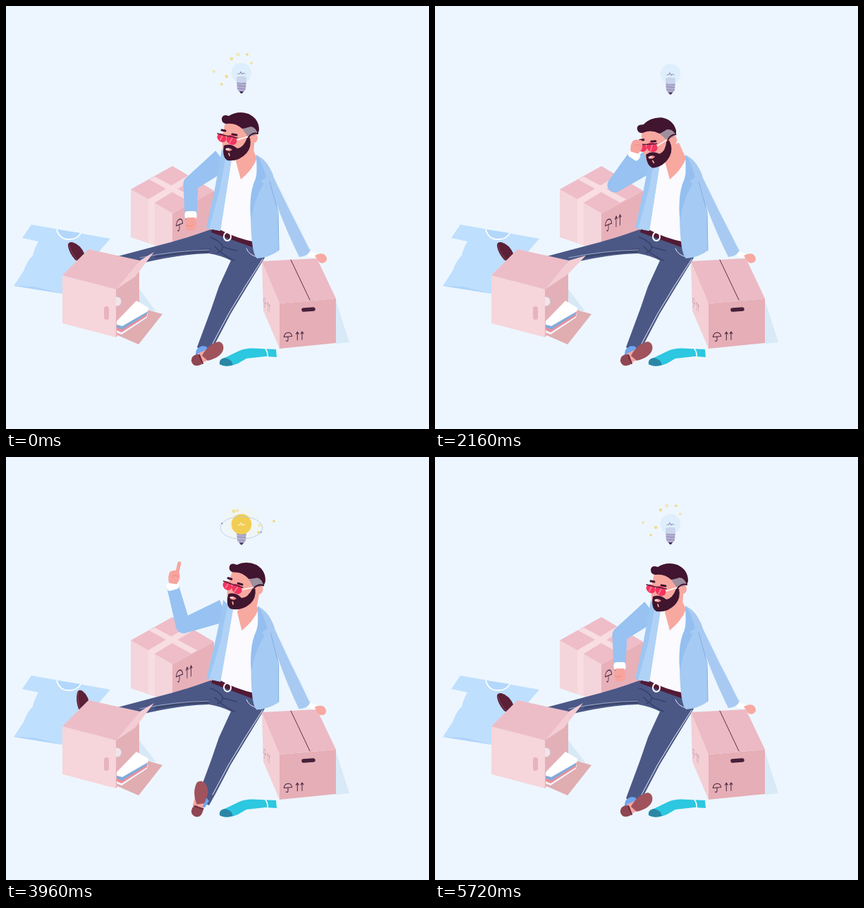
An HTML page that plays this animation: 600 by 600 pixels, repeating every 5.76 s.

```html
<!DOCTYPE html>
<html lang="en">
<head>
<meta charset="utf-8">
<title>Idea</title>
<style>
html, body { margin: 0; width: 100%; height: 100%; overflow: hidden; background: #edf6fe }
svg { display: block; width: 100vw; height: 100vh }
.line { fill: none; stroke-linecap: round; stroke-linejoin: round }
</style>
</head>
<body>
<svg viewBox="0 0 600 600">
<defs>
  <radialGradient id="halo">
    <stop offset=".3" stop-color="#fcf3c9"/>
    <stop offset="1" stop-color="#fcf3c9" stop-opacity="0"/>
  </radialGradient>
  <g id="marks" class="line" stroke="#4a2942" stroke-width="1.1">
    <path d="M-6 0Q-5 -6 0 -6Q5 -6 6 0ZM0 0V5Q-1 8 -3 6M14 6V-6M12 -3L14 -6L16 -3M21 6V-6M19 -3L21 -6L23 -3"/>
  </g>
</defs>

<!-- shirt on the floor -->
<path fill="#bfdffe" d="M36 310L148 330L134 346L100 408H80L11 397L25 376Q30 361 38 354Q40 344 46 334L23 329Z"/>
<path fill="#aed3fa" d="M11 397L40 398L80 408Z"/>
<path fill="#b3d7fb" stroke="#fff" stroke-width="1.8" d="M72 317Q76 331 89 331Q102 331 106 322"/>

<!-- taped box -->
<path fill="#f4d5db" d="M177 260L236 294V348L177 328Z"/>
<path fill="#e8b1ba" d="M236 294L295 262V330L236 348Z"/>
<path fill="#eebdc8" d="M236 227L295 262L236 294L177 260Z"/>
<path fill="#f8dde2" d="M203 246L211 242L271 274L263 279ZM259 240L267 245L211 279V340L202 336V274Z"/>
<use href="#marks" transform="translate(246 310) skewY(-22) scale(.78 1.25)"/>

<!-- far foot and legs -->
<g id="farFoot">
  <path fill="#5b2038" d="M88 341Q87 334 94 335Q106 338 112 353L110 366L98 360Q90 351 88 341Z"/>
  <path class="line" stroke="#8a4055" d="M89 339Q93 352 102 361"/>
</g>
<path fill="#4b5886" d="M290 317Q252 331 215 340L151 357L188 366Q245 352 288 351Q306 354 319 361L302 398L291 430L271 484Q278 490 288 494L297 478L319 436L342 398L367 357L352 335Z"/>
<path fill="#3c476f" d="M210 358Q250 350 287 350L290 344Q250 347 213 354Z"/>
<path class="line" stroke="#e9eefb" stroke-width="1" d="M364 359L339 398L316 436L293 479M341 344Q345 354 357 356"/>
<path class="line" stroke="#c6cfe8" stroke-width=".7" d="M190 357Q240 347 288 346"/>
<path class="line" stroke="#37406a" stroke-width="1.6" d="M290 328Q304 333 308 342L327 347M300 350Q311 345 305 337M296 341Q308 354 324 361"/>

<!-- open box -->
<path fill="#d7e9f7" d="M187 399L213 433L190 430Z"/>
<path fill="#e0adb1" d="M156 466L190 428L222 437L188 480Z"/>
<path fill="#e4b0b7" d="M155 402L189 362V428L156 470Z"/>
<circle cx="157" cy="419" r="7" fill="#f2e4e9" stroke="#c9bcc8"/>
<path fill="#f4f5fb" d="M157 456L190 432L201 437L200 442L164 466L157 463Z"/>
<path fill="#ec8f9b" d="M157 455L200 436V440L164 463L157 460Z"/>
<path fill="#82abd9" d="M157 449L200 432V437L165 459L157 456Z"/>
<path fill="#fff" d="M157 447L185 418L202 428Q203 433 198 435L165 454L157 452Z"/>
<path fill="#f6d5db" d="M80 382L156 402V470L80 450Z"/>
<path fill="#edbdc7" d="M117 345L190 361L156 402L80 382Z"/>
<rect x="139" y="426" width="7" height="19" rx="3.5" fill="#e7b3be"/>
<path id="flap" fill="#f4cdd4"/>

<!-- sock -->
<path fill="#2cc7e0" d="M304 502L331 489Q341 484 360 486L383 487L384 498L368 497L341 500L329 507Q313 514 303 508Z"/>
<path fill="#2b86a5" d="M303 508Q302 500 311 499Q320 501 322 509Q311 513 303 508Z"/>
<path class="line" stroke="#fff" stroke-width="1.5" d="M368 486Q372 492 371 498"/>

<!-- near foot -->
<path fill="#6ea5ee" d="M270 488Q276 480 284 483L288 488L282 497L268 499Z"/>
<g id="nearFoot">
  <path fill="#f4a59f" d="M272 493L285 487L292 499L279 506Z"/>
  <path fill="#a0535c" d="M278 496Q287 479 302 476Q310 478 308 488Q304 499 286 503Z"/>
  <path fill="#8f4652" d="M263 504Q262 496 271 494L276 496L278 508Q266 514 263 504Z"/>
  <path class="line" stroke="#6d2c40" stroke-width="2" d="M274 495L279 507"/>
</g>

<!-- closed box -->
<path fill="#d8e9f7" d="M468 418L487 477L468 479Z"/>
<path fill="#f4cfd5" d="M363 362L388 422V486L365 432Z"/>
<path fill="#e6aeb6" d="M388 422L468 415V478L388 486Z"/>
<path fill="#ecbac4" d="M363 362L441 358L468 415L388 422Z"/>
<path class="line" stroke="#5b3146" d="M404 360L431 417"/>
<path class="line" stroke="#46203a" stroke-width="5.5" d="M422 431L436 430"/>
<use href="#marks" transform="translate(400 469) skewY(-4) scale(.95)"/>
<use href="#marks" transform="translate(367 421) skewY(50) scale(.32 1)" opacity=".35"/>
<g id="restHand">
  <path fill="#fff" d="M429 347L441 352L438 358L428 355Z"/>
  <path fill="#f7a9a2" d="M438 354Q445 350 451 352Q457 357 454 362Q449 367 444 363Z"/>
</g>

<!-- upper body -->
<g id="body">
  <path fill="#521a35" d="M293 313L354 333L352 343L291 321Z"/>
  <ellipse class="line" stroke="#fff" stroke-width="2" cx="314" cy="327" rx="5" ry="6"/>
  <g id="sleeve" fill="#97c2f1"><path id="limbs"/><circle id="joint" r="10.5"/></g>
  <path fill="#fafaff" d="M318 214L303 317Q325 329 354 335L352 262L366 236L354 212Z"/>
  <path fill="#9dc6f2" d="M306 203Q301 235 296 260L284 315L304 319L320 216Z"/>
  <path fill="#b0d2f6" d="M312 212L320 217L304 319L288 316L303 262Z"/>
  <path fill="#f7a9a0" d="M326 220L334 198L346 194L356 216Q350 232 333 246Z"/>
  <path fill="#a5caf3" d="M355 211Q371 219 379 240L386 300L387 347Q373 357 356 358Q348 352 347 300Q344 272 356 246Z"/>
  <path fill="#94bff0" d="M355 211Q364 222 369 243L361 248L365 252Q350 280 348 303Q344 270 352 250Q358 238 355 211Z"/>
  <path fill="#a8caf2" d="M360 214Q371 221 376 235L384 252L403 291L432 346Q429 355 416 356Q403 330 391 300L374 256Z"/>
  <path class="line" stroke="#7faee6" d="M374 249L386 292L387 346"/>
  <path class="line" stroke="#e5f1fd" stroke-width="1.2" d="M387 256L405 293L431 345"/>

  <g id="head">
    <path fill="#f7a9a0" d="M311 165L306 188L308 208L336 214L351 210L353 184L350 168Z"/>
    <ellipse cx="352" cy="187" rx="5" ry="7" fill="#f7a9a0"/>
    <path fill="#9d8f9e" d="M335 174L352 168L358 178L352 184L346 183L344 188L340 181Z"/>
    <path fill="#41142f" d="M306 160Q307 153 316 156Q329 148 344 153Q359 160 359 176L357 182Q355 172 347 171Q338 174 335 174Q325 165 313 167Q306 167 306 160Z"/>
    <path fill="#40152e" d="M346 187Q349 200 341 209Q330 221 314 219Q306 214 309 198Q319 194 328 202Q337 201 342 187Z"/>
    <path fill="#f28f92" d="M312 202Q317 200 321 204L317 206L312 205Z"/>
    <path class="line" stroke="#fff" stroke-width="1.3" d="M312 203L316 203"/>
    <path class="line" stroke="#f7a9a0" stroke-width="1.8" d="M316 209L317 212"/>
    <path class="line" stroke="#41142f" stroke-width="3" d="M306 176L311 177M321 182L327 183"/>
    <ellipse cx="306" cy="187" rx="7" ry="5.6" fill="#f4345f" transform="rotate(38 306 187)"/>
    <ellipse cx="320" cy="190" rx="8" ry="6.5" fill="#f4345f" transform="rotate(38 320 190)"/>
    <path class="line" stroke="#ff8ba3" stroke-width="1.5" d="M304 190L307 184M317 194L321 187"/>
    <path class="line" stroke="#54203a" stroke-width="1.5" d="M300 181L312 184L328 187"/>
    <path class="line" stroke="#fff" stroke-width="1.5" d="M328 190L344 185"/>
    <path class="line" stroke="#41142f" stroke-width="2" d="M344 186Q350 179 357 181"/>
  </g>

  <g id="cuff"><rect x="-8.5" y="-6" width="17" height="11" rx="4" fill="#fff"/></g>
  <g id="hand">
    <path fill="#f7a49e" d="M-6 -4Q-10 -13 -7 -20Q0 -26 6 -21Q10 -14 5 -4Z"/>
    <path id="finger" class="line" stroke="#f7a49e" stroke-width="5"/>
    <path class="line" stroke="#e98888" stroke-width=".8" d="M-3 -14Q1 -18 6 -15"/>
  </g>
</g>

<!-- bulb, drawn around its glass -->
<g id="bulb">
  <circle id="glow" r="28" fill="url(#halo)"/>
  <path fill="#b4afd0" d="M-7 6Q0 3 7 6L6 23L3 27H-3L-6 23Z"/>
  <path class="line" stroke="#928cb8" d="M-6 14L6 15M-6 18L6 19M-5 22L5 23"/>
  <path fill="#40335d" d="M-3 26H3L1 29H-1Z"/>
  <circle id="glass" r="14.3"/>
  <path id="wire" class="line" d="M-5 1L-2 1L-1 -2L1 2L2 0L5 1"/>
  <g id="orbit">
    <ellipse class="line" cy="5" rx="30" ry="16" stroke="#bccae0" stroke-width=".8"/>
    <circle class="dot" r="1.3" fill="#93a3cb"/><circle class="dot" r="1.3" fill="#93a3cb"/>
  </g>
</g>
<g id="sparks"></g>
</svg>

<script>
const LOOP = 5760, $ = id => document.getElementById(id);
const set = (el, attrs) => { for (const k in attrs) el.setAttribute(k, attrs[k]); };
const ease = u => u < .5 ? 4 * u ** 3 : 1 - 4 * (1 - u) ** 3;

// elbow x, y, forearm angle, length, hand angle, finger, head, lean, lift, flap
const rest  = [262, 252, -180, 44, -180, 0, 0, 0, 0, 0];
const touch = [255, 255, 32, 48, 25, 0, -12.6, 0, 0, 1];
const rub   = [255, 254, 33, 50, 16, .1, -14.5, 0, 0, 1];
const point = [250, 241, -16, 58, 8, 1, 4, 1, 1, 0];
const proud = [250, 241, -16, 58, 8, 1, 5.2, 1, 1.08, 0];
const poses = [[0, rest], [60, rest], [620, touch], [1250, touch], [1850, rub], [2500, rub],
  [3040, point], [3700, proud], [5120, proud], [5680, rest], [LOOP, rest]];

const clear = [213, 233, 251, .65], warm = [241, 205, 84, 1];
const tints = [[0, clear], [2880, clear], [3080, [251, 241, 190, .75]], [3500, warm], [4100, warm],
  [4700, [248, 227, 140, .85]], [5250, clear], [LOOP, clear]];
const glows = [[0, [0]], [2850, [0]], [3080, [1]], [3700, [.5]], [4400, [.1]], [5100, [0]], [LOOP, [0]]];
const orbits = [[0, [0]], [2860, [0]], [3060, [1]], [4900, [1]], [5250, [0]], [LOOP, [0]]];

function at(keys, t) {
  const i = Math.max(1, keys.findIndex(k => k[0] >= t));
  const [t0, a] = keys[i - 1], [t1, b] = keys[i], u = ease((t - t0) / (t1 - t0));
  return a.map((v, j) => v + (b[j] - v) * u);
}

// time of full brightness, then points around the glass
const bursts = [
  [5740, [295, 93], [313, 100], [306, 111], [329, 69], [342, 69], [320, 75], [348, 81]],
  [3080, [305, 79], [340, 67], [357, 67], [298, 97], [297, 105], [320, 120]],
  [3960, [328, 76], [323, 77], [380, 91], [360, 97], [358, 107]],
  [4680, [329, 83], [354, 86], [365, 99], [367, 121], [309, 107], [356, 92]]
];
const sparks = bursts.flatMap(([time, ...pts]) => pts.map(([x, y], i) => {
  const el = document.createElementNS("http://www.w3.org/2000/svg", "circle");
  set(el, { r: i % 2 ? 1.8 : 1.4, fill: i % 3 ? "#f3df97" : "none", stroke: "#efd573", "stroke-width": .9 });
  $("sparks").append(el);
  return { el, time, x, y };
}));

function limb(x0, y0, w0, x1, y1, w1) {
  const d = Math.hypot(x1 - x0, y1 - y0), nx = (y0 - y1) / d, ny = (x1 - x0) / d;
  return `M${x0 + nx * w0} ${y0 + ny * w0}L${x1 + nx * w1} ${y1 + ny * w1}` +
    `L${x1 - nx * w1} ${y1 - ny * w1}L${x0 - nx * w0} ${y0 - ny * w0}Z`;
}

function draw(t) {
  const [ex, ey, arm, len, hand, finger, head, lean, lift, flap] = at(poses, t);
  const a = arm * Math.PI / 180, wx = ex + Math.sin(a) * len, wy = ey - Math.cos(a) * len;
  set($("limbs"), { d: limb(307, 218, 16, ex, ey, 10.5) + limb(ex, ey, 10.5, wx, wy, 8.5) });
  set($("joint"), { cx: ex, cy: ey });
  set($("cuff"), { transform: `translate(${wx} ${wy}) rotate(${arm})` });
  set($("hand"), { transform: `translate(${wx} ${wy}) rotate(${hand})` });
  set($("finger"), { d: `M3 -19L${3 + finger} ${-20 - 14 * finger}` });
  set($("head"), { transform: `rotate(${head} 354 243)` });
  set($("body"), { transform: `rotate(${lean} 325 330)` });
  set($("nearFoot"), { transform: `translate(${-2 * lift} 0) rotate(${-46 * lift} 272 500)` });
  set($("farFoot"), { transform: `translate(${3 * lift} 0) rotate(${21 * lift} 107 362)` });
  set($("restHand"), { transform: `rotate(${6 * lift} 434 352)` });
  set($("flap"), { d: `M156 402L190 361L${210 + 4 * flap} ${349 + 5 * flap}L${183 + 6 * flap} ${384 - 4 * flap}Z` });

  const y = 95 + 5.3 * (1 - Math.cos(t / 1920 * 2 * Math.PI));
  const [r, g, b, alpha] = at(tints, t), [glow] = at(glows, t), [orbit] = at(orbits, t);
  set($("bulb"), { transform: `translate(334 ${y})` });
  set($("glass"), { fill: `rgba(${r},${g},${b},${alpha})` });
  set($("glow"), { opacity: glow });
  set($("wire"), { stroke: orbit > .5 ? "#fff7d5" : "#8c8caf" });
  set($("orbit"), { opacity: orbit });
  document.querySelectorAll(".dot").forEach((dot, i) => {
    const q = t / 1920 * 2 * Math.PI + i * Math.PI;
    set(dot, { cx: 30 * Math.cos(q), cy: 5 + 16 * Math.sin(q) });
  });

  for (const s of sparks) {
    const dt = (t - s.time + LOOP * 1.5) % LOOP - LOOP / 2;
    const out = 1 + dt / 2500;
    set(s.el, {
      cx: 334 + (s.x - 334) * out, cy: 98 + (s.y - 98) * out,
      opacity: Math.max(0, 1 - (dt < 0 ? -dt / 350 : dt / 550))
    });
  }
}

function tick() {
  draw(performance.now() % LOOP);
  requestAnimationFrame(tick);
}
tick();
</script>
</body>
</html>
```
